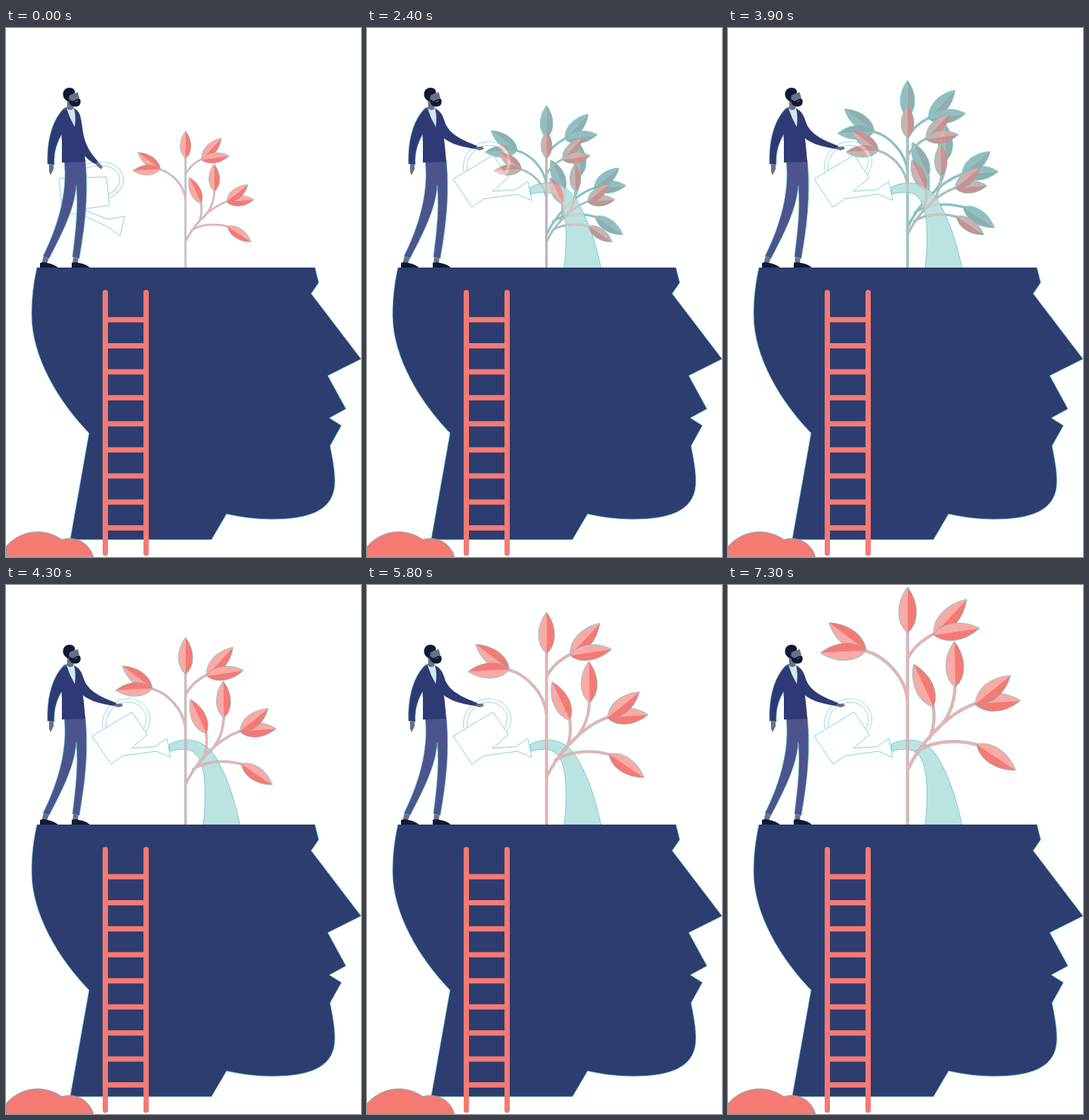
These frames come from a looping animation (470 px wide and 700 px high, 8000 ms). An HTML page with a canvas:

```html
<!DOCTYPE html>
<html lang="en">
<head>
<meta charset="utf-8">
<title>Growing ideas</title>
<style>
  html, body { margin: 0; width: 100%; height: 100%; overflow: hidden; background: #fff; }
  canvas { display: block; }
</style>
</head>
<body>
<canvas id="stage" width="470" height="700"></canvas>
<script>
const W = 470, H = 700, LOOP = 8000;
const NAVY = '#2d3d6f', CORAL = '#f57a74', PINK = '#f8aaa6', TEAL = '#5fc9cc';
const SUIT = '#2f3a74', TROUSERS = '#4d548d', SKIN = '#6c7087', INK = '#0f1a33';
const SHIRT = '#cdebec', WATER = '#bbe3e1', EDGE = 'rgba(80,190,198,0.75)';

const stage = document.getElementById('stage').getContext('2d');
const buffer = document.createElement('canvas');
buffer.width = W;
buffer.height = H;
const layer = buffer.getContext('2d');

function fill(c, d, color, edge) {
  const p = new Path2D(d);
  c.fillStyle = color;
  c.fill(p);
  if (edge) line(c, p, edge, 0.9);
}

function line(c, d, color, width, cap = 'butt') {
  c.strokeStyle = color;
  c.lineWidth = width;
  c.lineCap = cap;
  c.stroke(d instanceof Path2D ? d : new Path2D(d));
}

// Draws a group as one unit, either faded or as a flat tinted silhouette.
function group(draw, alpha, tint) {
  layer.clearRect(0, 0, W, H);
  draw(layer);
  if (tint) {
    layer.globalCompositeOperation = 'source-in';
    layer.fillStyle = tint;
    layer.fillRect(0, 0, W, H);
    layer.globalCompositeOperation = 'source-over';
  }
  stage.globalAlpha = alpha;
  stage.drawImage(buffer, 0, 0);
  stage.globalAlpha = 1;
}

// Tree at full size: base x, y, tip x, y, half width, dark side (1 = right of the base-to-tip direction)
const LEAVES = [
  [238, 63, 238, 3, 11.5, 1],
  [273, 65, 316, 19, 11.5, 1],
  [273, 66, 333, 57, 11, 1],
  [183, 87, 134, 50, 11, 1],
  [183, 87, 123, 90, 11, 1],
  [272, 161, 246, 105, 11.5, 1],
  [301, 135, 300, 75, 11.5, 1],
  [327, 157, 387, 153, 11.5, 1],
  [328, 157, 374, 120, 11, 1],
  [330, 211, 381, 245, 11, 1]
];
const BRANCHES = [
  'M238 60V342',
  'M238 98Q247 78 274 64',
  'M238 153C235 121 208 94 182 87',
  'M238 245C252 214 287 171 328 157',
  'M249 221C268 207 302 203 332 212',
  'M266 204C273 192 274 176 272 160',
  'M274 194C292 179 300 158 301 134'
].join('');

function leaf(c, [bx, by, tx, ty, w, dark]) {
  const len = Math.hypot(tx - bx, ty - by);
  const half = s => `M0 0C${len * 0.2} ${s * w * 1.25} ${len * 0.62} ${s * w * 1.42} ${len} 0`;
  c.save();
  c.translate(bx, by);
  c.rotate(Math.atan2(ty - by, tx - bx));
  line(c, half(1) + half(-1), EDGE, 1.6);
  fill(c, half(-dark) + 'Z', PINK);
  fill(c, half(dark) + 'Z', CORAL);
  line(c, `M0 0H${len}`, PINK, 0.5);
  c.restore();
}

function tree(size) {
  return c => {
    const s = (1 + 0.162 * size) / 1.648;
    c.save();
    c.translate(237.7, 341.6);
    c.scale(s, s);
    c.translate(-238, -341.6);
    line(c, BRANCHES, EDGE, 4.2);
    line(c, BRANCHES, '#f6aeaa', 3.1);
    LEAVES.forEach(l => leaf(c, l));
    c.restore();
  };
}

const POSES = {
  rest: {
    handle: 'M94 191C104 180 122 178 136 181C151 185 157 199 150 211C146 218 140 221 134 223',
    can: 'M70 199L133 197L137 235L105 239L108 243L135 253L157 249L151 275L133 262L104 249L82 244L75 243Z',
    arm: 'M92 108C99 112 100 124 102 138C105 156 112 165 122 177L118 180C107 174 97 164 95 150Z',
    hand: 'M118 179L122 177L128 184L126 187L121 183Z'
  },
  pour: {
    handle: 'M130 189C128 168 143 153 161 153C180 152 192 170 187 184C186 189 183 193 181 196',
    can: 'M114 200L167 168L187 198L166 216L197 214L213 203L218 228L199 220L155 226L139 237Z',
    arm: 'M92 108C99 111 101 118 104 127C111 142 128 149 146 156L143 160C123 157 105 152 96 140Z',
    hand: 'M144 157L153 157L155 160L149 162L143 160Z'
  }
};

const can = pose => c => {
  line(c, pose.handle, EDGE, 5.6);
  line(c, pose.handle, '#fff', 4.2);
  fill(c, pose.can, '#fff', EDGE);
};

const arm = pose => c => {
  fill(c, pose.hand, SKIN);
  fill(c, pose.arm, SUIT);
};

function man(c) {
  fill(c, 'M50 301L57 304L54 312L47 312ZM89 303L96 304L95 312L88 312Z', SKIN);
  fill(c, 'M45 317V311Q50 309 55 311Q62 312 69 317ZM87 317V311Q92 309 97 311Q105 312 111 317Z', INK);
  fill(c, 'M77 175C82 217 69 262 49 302L57 305C74 272 91 240 93 208C96 240 92 270 88 303L97 305C103 270 110 225 105 175Z', TROUSERS, EDGE);
  fill(c, 'M57 180L63 180L63 187L59 195L57 190Z', SKIN);
  fill(c, 'M78 105C61 121 54 149 55 180L64 181C63 163 68 150 76 137Z', SUIT, EDGE);
  fill(c, 'M79 105C72 117 73 136 74 150L74 178L105 177C103 152 101 139 99 120C98 113 95 109 90 106Z', SUIT);
  fill(c, 'M80 106L90 106Q93 117 91 131Q84 119 80 106Z', SHIRT);
  fill(c, 'M81 96L91 99L89 107Q85 110 81 107Z', SKIN);
  fill(c, 'M79 89L95 85L98 96L89 102L81 99Z', SKIN);
  fill(c, 'M76 91C74 84 78 79 84 79C89 79 92 82 91 86L84 89L83 97Q78 96 76 91Z', INK);
  fill(c, 'M83 94L88 97L94 94L98 94C100 99 98 104 92 104C86 104 83 100 83 94Z', INK);
  line(c, 'M91 98L95 96', SKIN, 1);
}

function water(c) {
  fill(c, 'M216 211C232 202 263 199 280 232C295 258 304 290 310 318H261C266 272 265 226 244 219C234 216 225 218 217 220Z', WATER, EDGE);
}

function scenery(c) {
  fill(c, 'M409 317L414 337L404 351.5L470 438L426 460L450 504L428 516L444 526L429 553' +
    'C434 578 436 592 435 606C432 639 400 650 352 650C330 650 310 647 292 643L272 677H85L110 536' +
    'C70 495 34 435 34 380C34 355 37 335 41 317', NAVY, EDGE);
  line(c, 'M131.5 350V695M185.5 350V695', CORAL, 7, 'round');
  for (let i = 0; i < 9; i++) line(c, `M131.5 ${386 + i * 34.45}H185.5`, CORAL, 7);
  fill(c, 'M0 686A55 55 0 0 1 74 676.8A33 33 0 0 1 116 700H0Z', CORAL, EDGE);
}

// Tree size now and the stepped blend towards the next one.
function growth(t) {
  let size = 0, mix = 0;
  for (let i = 0; i < 4; i++) {
    const since = t - (2300 + 1500 * i);
    if (since >= 500) size = i + 1;
    else if (since >= 0) mix = (Math.floor(since / 100) + 1) / 6;
  }
  return { size, mix };
}

function render(t) {
  const c = stage;
  const { rest, pour } = POSES;
  const { size, mix } = growth(t);
  const turning = t >= 500 && t < 600;
  const pose = t < 500 ? rest : pour;
  c.fillStyle = '#fff';
  c.fillRect(0, 0, W, H);

  if (mix) [size, size + 1].forEach(n => group(tree(n), 1, TEAL));
  if (turning) {
    [rest, pour].forEach(p => group(l => { can(p)(l); arm(p)(l); }, 1, TEAL));
    group(can(pour), 0.5);
    group(can(rest), 0.5);
  } else {
    can(pose)(c);
  }

  man(c);
  if (turning) {
    group(arm(pour), 0.5);
    group(arm(rest), 0.5);
  } else {
    arm(pose)(c);
  }

  if (t >= 1300) water(c);
  if (mix) {
    group(tree(size + 1), mix);
    group(tree(size), 1 - mix);
  } else {
    tree(size)(c);
  }
  scenery(c);
}

const start = performance.now();
function tick() {
  render((performance.now() - start) % LOOP);
  requestAnimationFrame(tick);
}
tick();
</script>
</body>
</html>
```
